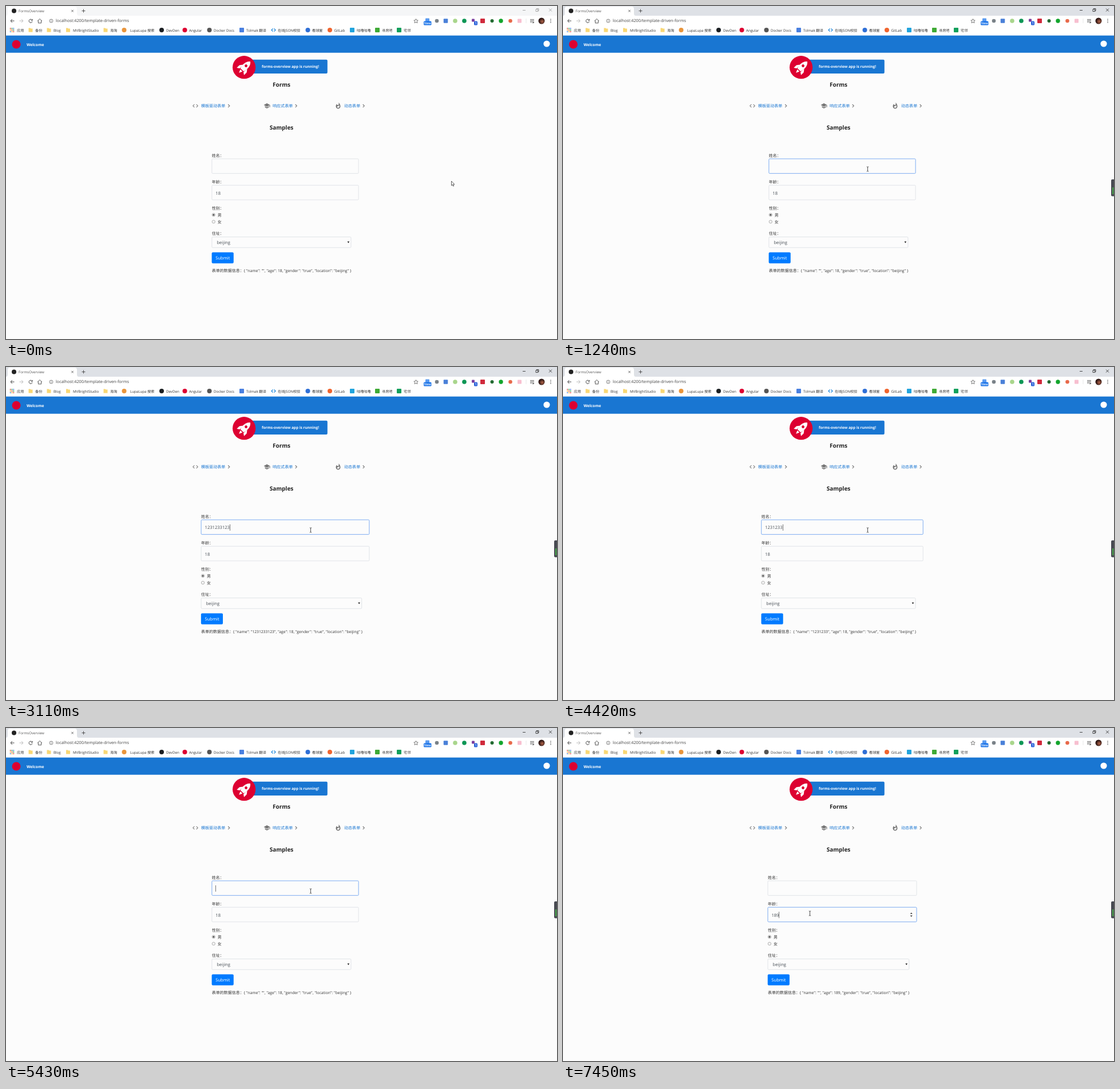
An HTML page for the animation above (8 s loop, 963 px wide and 582 px high).

```html
<!DOCTYPE html>
<html lang="zh-CN">
<head>
<meta charset="utf-8">
<title>Forms demo</title>
<style>
html, body { margin: 0; width: 100%; height: 100%; overflow: hidden; background: #fcfcfc; }
svg { display: block; width: 963px; height: 582px; }
text { font-family: "Open Sans", "Noto Sans CJK SC", "Noto Sans CJK", sans-serif; text-rendering: geometricPrecision; white-space: pre; }
</style>
</head>
<body>
<svg id="stage" viewBox="0 0 963 582" xmlns="http://www.w3.org/2000/svg"></svg>
<script>
const LOOP = 8000, BLINK = 530, NAME_CLICK = 710, AGE_CLICK = 6160, AGE_KEY = 7370;
const NAME = "1231233123";
// [time, number of characters in the name field]
const KEYS = [[0, 0], [2100, 2], [2170, 3], [2420, 4], [2490, 6], [2880, 7], [3030, 9], [3110, 10],
  [4040, 9], [4270, 8], [4420, 7], [4500, 6], [4650, 5], [4880, 4], [4960, 3], [5130, 2], [5280, 1], [5430, 0]];

const text = (x, y, str, size, fill = "#333", attrs = "") =>
  `<text x="${x}" y="${y}" font-size="${size}" fill="${fill}" ${attrs}>${str}</text>`;
const rect = (x, y, w, h, fill, attrs = "") =>
  `<rect x="${x}" y="${y}" width="${w}" height="${h}" fill="${fill}" ${attrs}/>`;
const dot = (x, y, r, fill, attrs = "") => `<circle cx="${x}" cy="${y}" r="${r}" fill="${fill}" ${attrs}/>`;
const fill = (d, color, attrs = "") => `<path d="${d}" fill="${color}" ${attrs}/>`;
const line = (d, color = "#555", width = 1, attrs = "") =>
  `<path d="${d}" fill="none" stroke="${color}" stroke-width="${width}" ${attrs}/>`;
const square = (x, y, color, s = 8) => rect(x - s / 2, y - s / 2, s, s, color, 'rx="1"');

function tabStrip() {
  return rect(0, 0, 963, 17, "#dee1e6", 'id="strip"') +
    fill("M0 17Q3 17 3 13V5Q3 1 7 1H120Q124 1 124 5V13Q124 17 127 17Z", "#fff") +
    dot(14, 8.5, 4, "#222") + text(22, 11, "FormsOverview", 6.2, "#555") +
    line("M114.3 6.8l3.6 3.6m0-3.6l-3.6 3.6", "#444", .8) +
    line("M132.5 8.5h6M135.5 5.5v6", "#444", .9) +
    '<g id="controls" fill="none" stroke-width=".8">' +
    '<path d="M903 7.5h5M926 5.8h3.7v3.7h-3.7zM927.2 5.6V4.6h3.8v3.8h-1M949 4.5l5 5m0-5l-5 5"/></g>';
}

function toolbar() {
  const nav = line("M14.5 26H8m3-3l-3 3 3 3", "#444") + line("M23.5 26H30m-3-3l3 3-3 3", "#bbb") +
    line("M45.4 24.2A3 3 0 1 0 46 27M46.2 22.8v2.4h-2.4", "#444") +
    line("M55 26.3l4-3.8 4 3.8M56.4 25.5v4.3h5.2v-4.3", "#444", .9) +
    dot(79, 26, 3, "none", 'stroke="#555" stroke-width=".7"') + line("M79 25.6v2M79 24v.8", "#555", .8) +
    text(87, 28.4, "localhost:4200/template-driven-forms", 7.25, "#444");
  const star = fill("M716.5 22.5l1.1 2.4 2.6.3-1.9 1.8.5 2.6-2.3-1.3-2.3 1.3.5-2.6-1.9-1.8 2.6-.3z", "none",
    'stroke="#555" stroke-width=".8"');
  const badges = square(736.5, 25, "#5b9bf0", 7) + rect(730, 26.5, 13.5, 7, "#1a73e8", 'rx="1.5"') +
    text(736.8, 32.2, "New", 5.6, "#fff", 'text-anchor="middle" font-weight="600"') +
    square(816.5, 25, "#7b3fa0", 5) + rect(818, 26.5, 6, 7, "#2a62d9", 'rx="1.5"') +
    text(821, 32.3, "1", 5.6, "#fff", 'text-anchor="middle" font-weight="600"');
  const extensions = dot(753, 26, 3.3, "#7a8288") + square(768.5, 26, "#4a80d8", 7.5) + dot(785, 26, 3.8, "#a9d68c") +
    dot(801, 26, 3.8, "#0d9655") + square(833, 26, "#d02a3c") + dot(849.5, 26, 3, "#236b32") +
    dot(865, 26, 3.7, "#12a52c") + dot(881.5, 26, 3.3, "#e8694a") + square(897.5, 26, "#f8bfd0", 7);
  const menu = line("M909 22v8", "#ddd", .7) + line("M916 23.6h7M916 25.8h7M916 28h3.5", "#555", .9) +
    fill("M920.5 27l3 1.7-3 1.7z", "#555") + dot(936, 26, 5.5, "url(#portrait)") +
    [23.2, 26, 28.8].map(y => dot(952, y, .8, "#444")).join("");
  return rect(0, 17, 963, 35, "#fff") + nav + star + badges + extensions + menu;
}

function bookmarks() {
  const y = 42;
  const folder = x => fill(`M${x - 3.5} ${y - 3.5}h3l1 1h3v6h-7z`, "#f8d775");
  const circle = c => x => dot(x, y, 4, c);
  const box = c => x => square(x, y, c);
  const grid = x => [0, 1, 2, 3, 4, 5, 6, 7, 8].map(i =>
    rect(x - 3.7 + i % 3 * 2.8, y - 3.7 + Math.floor(i / 3) * 2.8, 1.8, 1.8,
      ["#e04a3f", "#34a853", "#4a80e8", "#f0b429"][i % 4])).join("");
  const brackets = x => line(`M${x - 1} ${y - 2.5}l-2.5 2.5 2.5 2.5m2-5l2.5 2.5-2.5 2.5`, "#2d8fdd", 1.4);
  return [[10.5, 19, "应用", grid], [43, 51, "备份", folder], [75, 83, "Blog", folder],
    [108.5, 117, "MVBrightStudio", folder], [174, 182, "海淘", folder],
    [206.5, 217, "LupaLupa 搜索", circle("#e9953c")], [272, 280, "DevDen", circle("#1b1f23")],
    [312.5, 320, "Angular", circle("#dd0031")], [355.5, 363, "Docker Docs", circle("#555")],
    [412, 420, "Tolmak 翻译", box("#4a80e0")], [467.5, 475, "在线JSON校验", brackets],
    [527.5, 535, "看球屋", circle("#2f6fd6")], [566, 573.5, "GitLab", circle("#f0652f")],
    [605, 613, "咕噜咕噜", box("#22a4dd")], [649, 657, "寻房吧", box("#3faa36")], [687, 695, "宅邻", box("#12a05c")]]
    .map(([ix, tx, label, icon]) => icon(ix) + text(tx, 44.6, label, 6.2)).join("");
}

function page() {
  const mid = 'text-anchor="middle" font-weight="700"';
  const icon = (x, d) => fill(d, "#777", `transform="translate(${x} 168.5) scale(.5)"`);
  const chevron = x => line(`M${x - 1.3} 172l2.6 2.6-2.6 2.6`, "#777", 1.1);
  const rocket = '<g transform="translate(416 108) rotate(45)">' +
    fill("M0-15.5C6-11 6.4-3 4 5H-4C-6.4-3-6-11 0-15.5ZM5.4-2.5L9 2.5V9L4.6 6ZM-5.4-2.5L-9 2.5V9L-4.6 6ZM-2.6 6.5H2.6L0 12.5Z", "#fff") +
    dot(0, -5, 2.4, "#dd0031") + "</g>";
  return rect(0, 51.6, 963, 30.1, "#1976d2") + dot(18, 67, 7.5, "#dd0031") +
    text(36, 69.8, "Welcome", 6.7, "#fff", 'font-weight="700"') + dot(945, 66, 5.6, "#fff") +
    rect(416, 93.8, 145.8, 24.1, "#1976d2", 'rx="2"') + dot(416.1, 107.2, 20.1, "#dd0031") + rocket +
    text(497, 108.3, "forms-overview app is running!", 6.48, "#fff", mid) +
    text(481.5, 141.4, "Forms", 10, "#222", mid) + text(481.5, 216.4, "Samples", 10, "#222", mid) +
    icon(325, "M9.4 16.6L4.8 12l4.6-4.6L8 6l-6 6 6 6 1.4-1.4zm5.2 0l4.6-4.6-4.6-4.6L16 6l6 6-6 6-1.4-1.4z") +
    icon(450, "M5 13.18v4L12 21l7-3.82v-4L12 17l-7-3.82zM12 3L1 9l11 6 9-4.91V17h2V9L12 3z") +
    icon(574.5, "M13.5.67s.74 2.65.74 4.8c0 2.06-1.35 3.73-3.41 3.73-2.07 0-3.63-1.67-3.63-3.73l.03-.36C5.21 7.51 4 10.62 4 14c0 4.42 3.58 8 8 8s8-3.58 8-8C20 8.61 17.41 3.8 13.5.67zM11.71 19c-1.78 0-3.22-1.4-3.22-3.14 0-1.62 1.05-2.76 2.81-3.12 1.77-.36 3.6-1.21 4.62-2.58.39 1.29.59 2.65.59 4.04 0 2.65-2.15 4.8-4.8 4.8z") +
    text(341, 177.1, "模板驱动表单", 7.05, "#1976d2") + text(466, 177.1, "响应式表单", 7.05, "#1976d2") +
    text(591, 177.1, "动态表单", 7.05, "#1976d2") + [389.5, 507, 625].map(chevron).join("");
}

// The form hugs its last line, so each typed character widens it on both sides.
function form({ name, age, focus, caret, spinner }) {
  const left = 359.6 - 1.875 * (name.length + age.length - 2);
  const width = 976 - 2 * left, listWidth = width - 13.2;
  const outline = (y, w, h, focused) => rect(.25, y + .25, w - .5, h - .5, "#fcfcfc",
    `rx="1.5" stroke="${focused ? "#6fa3f0" : "#ced4da"}" stroke-width="${focused ? .9 : .6}"`);
  const field = (y, value, focused) => outline(y, width, 26.1, focused) +
    text(6.7, y + 16.6, value, 7.6, "#495057") +
    (focused && caret ? rect(Math.round(left + 6.6 + 4.35 * value.length) - left, y + 8.2, .8, 11, "#555") : "");
  const radio = (y, label, on) => dot(3.2, y, 2.7, "#f4f4f4", 'stroke="#999" stroke-width=".7"') +
    (on ? dot(3.2, y, 1.5, "#444") : "") + text(10.2, y + 2.7, label, 7);
  const data = `{ "name": "${name}", "age": ${age}, "gender": "true", "location": "beijing" }`;
  return `<g transform="translate(${left} 0)">` +
    text(.2, 263.6, "姓名：", 7) + field(266.8, name, focus === "name") +
    text(.2, 309.7, "年龄：", 7) + field(313, age, focus === "age") +
    (spinner ? fill(`M${width - 11.5} 325l2-2.6 2 2.6zm0 2.6l2 2.6 2-2.6z`, "#444") : "") +
    text(.2, 356, "性别：", 7) + radio(365, "男", true) + radio(377, "女", false) +
    text(.2, 400.2, "住址：", 7) + outline(403.4, listWidth, 19.1, false) +
    text(8.8, 416.4, "beijing", 7.6, "#495057") + fill(`M${listWidth - 6.6} 411.5h3.6l-1.8 3z`, "#222") +
    rect(0, 430.5, 38.2, 19.2, "#007bff", 'rx="2"') +
    text(19.2, 443, "Submit", 7.6, "#fff", 'text-anchor="middle"') +
    text(.2, 465.2, "表单的数据信息：", 7) + text(55.9, 465.2, data, 6.74) + "</g>";
}

function pointer(x, y, beam) {
  if (beam) return line(`M${x - 1.7} ${y - 4}h1.2l.5.5.5-.5h1.2M${x} ${y - 3.5}v7M${x - 1.7} ${y + 4}h1.2l.5-.5.5.5h1.2`, "#222", .8);
  return fill(`M${x} ${y}v7.8l1.8-1.6 1.2 2.8 1.2-.5-1.2-2.7h2.4z`, "#fff", 'stroke="#222" stroke-width=".7"');
}

const ease = (t, from, to) => {
  const u = Math.min(1, Math.max(0, (t - from) / (to - from)));
  return u * u * (3 - 2 * u);
};

// The pointer is sampled about every 77 ms, like a screen recording.
function mouse(t) {
  const q = Math.floor(t / 77.5) * 77.5;
  const a = ease(q, 0, 640), b = ease(q, 5540, 6120);
  return [778.5 - 246 * a - 101 * b, 306 - 21 * a ** 2 + 39 * b];
}

function draw(t) {
  const active = t >= NAME_CLICK;
  const [keyTime, count] = KEYS.filter(k => k[0] <= t).pop();
  const focus = !active ? "" : t < AGE_CLICK ? "name" : "age";
  const last = t >= AGE_KEY ? AGE_KEY : focus === "age" ? AGE_CLICK : Math.max(keyTime, NAME_CLICK);
  const caret = Math.floor((t - last) / BLINK) % 2 === 0;
  const [x, y] = mouse(t);
  const inField = top => x > 360 && x < 616 && y > top && y < top + 27;
  const overAge = inField(312);
  strip.setAttribute("fill", active ? "#dee1e6" : "#f5f6f7");
  controls.setAttribute("stroke", active ? "#222" : "#999");
  recorder.setAttribute("visibility", active ? "visible" : "hidden");
  live.innerHTML = form({ name: NAME.slice(0, count), age: t < AGE_KEY ? "18" : "189",
    focus, caret, spinner: overAge || focus === "age" }) + pointer(x, y, overAge || inField(266));
}

const $ = id => document.getElementById(id);
$("stage").innerHTML = '<defs><radialGradient id="portrait" cx=".6" cy=".6"><stop stop-color="#b5654a"/>' +
  '<stop offset="1" stop-color="#2a1412"/></radialGradient></defs>' +
  rect(0, 0, 963, 582, "#fcfcfc") + tabStrip() + toolbar() + bookmarks() + page() +
  '<g id="recorder">' + rect(958, 303, 8, 29.5, "#484a52", 'rx="2"') + rect(960.3, 317, 1.6, 12, "#4cc04c") + "</g>" +
  '<g id="live"></g>';
const strip = $("strip"), controls = $("controls"), recorder = $("recorder"), live = $("live");

const start = performance.now();
function tick() {
  draw((performance.now() - start) % LOOP);
  requestAnimationFrame(tick);
}
tick();
</script>
</body>
</html>
```
